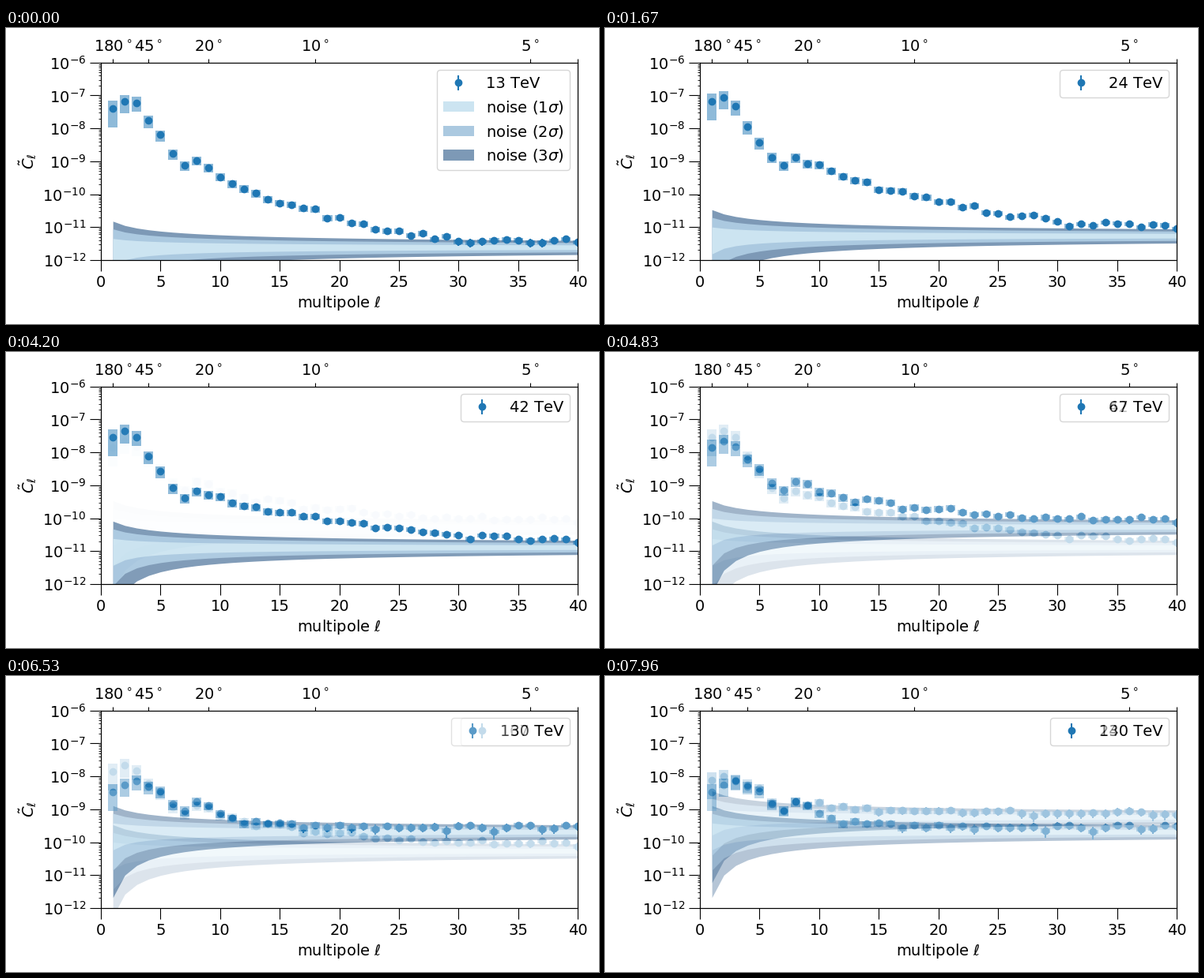
Recreate the animation shown at these times as a matplotlib script. Size 750 by 375 pixels, loop 7.99 s.

```python
import numpy as np
import matplotlib.pyplot as plt
from matplotlib.animation import FuncAnimation
from matplotlib.patches import Patch

plt.rcParams.update({"font.family": "DejaVu Sans", "font.size": 14,
                     "text.kerning_factor": 6})

W, H, DPI = 750, 375, 100
TICK, HOLD, STEP, STEPS = 10, 800, 30, 30
CYCLE = HOLD + STEP * STEPS
LOOP = 7990

BLUE = "#1f77b4"
BANDS = ["#cce4f1", "#abc9e0", "#7d99b6"]  # 1, 2, 3 sigma
TAILS = np.array([0.158655, 0.022750, 0.001350])

ell = np.arange(1, 41)
spread = 0.9 * np.sqrt(2 / (2 * ell + 1))

# energy in TeV: -log10 of the noise level, and of the power at the knots
KNOTS = [1, 2, 3, 5, 8, 12, 30, 40]
SPECTRA = {
    13: (11.61, [7.40, 7.18, 7.22, 8.19, 8.95, 9.85, 11.42, 11.42]),
    24: (11.26, [7.18, 7.06, 7.33, 8.42, 8.86, 9.42, 10.85, 10.97]),
    42: (10.88, [7.53, 7.36, 7.53, 8.57, 9.16, 9.58, 10.50, 10.70]),
    67: (10.26, [7.85, 7.67, 7.84, 8.50, 8.86, 9.38, 10.03, 10.08]),
    130: (9.68, [8.48, 8.26, 8.14, 8.44, 8.74, 9.45, 9.58, 9.52]),
    240: (9.23, [8.12, 7.99, 8.12, 8.36, 8.75, 8.97, 9.12, 9.14]),
}


def spectrum(energy, levels):
    """Knots joined in log-log, a dip near l = 6.6 and scatter beyond l = 8."""
    logs = np.interp(np.log(ell), np.log(KNOTS), levels)
    logs += 0.5 * np.exp(-((ell - 6.6) / 0.8) ** 2)
    logs += np.random.default_rng(energy).normal(0, 0.05, ell.size) * (ell > 8)
    return 10 ** -logs


def chi2_log(dof, probs):
    """log10 of the quantiles of chi2/dof."""
    t = np.linspace(-14, 6, 8001)
    cdf = np.cumsum(np.exp(dof / 2 * (t - np.log(dof) + 1) - np.exp(t) / 2))
    return (np.interp(probs, cdf / cdf[-1], t) - np.log(dof)) / np.log(10)


lower = np.array([chi2_log(2 * l + 1, TAILS) for l in ell])
upper = 1.1 * np.array([chi2_log(2 * l + 1, 1 - TAILS) for l in ell])


def style(ax):
    ax.set_yscale("log")
    ax.set_xlim(0, 40)
    ax.set_ylim(1e-12, 1e-6)
    ax.set_xticks(range(0, 41, 5))
    ax.tick_params(which="major", length=10)
    ax.set_xlabel(r"multipole $\ell$")
    ax.set_ylabel(r"$\tilde{C}_\ell$")
    top = ax.twiny()
    top.set_xlim(0, 40)
    marks = [1, 4, 9, 18, 36]
    top.set_xticks(marks + [40], [rf"${180 // m}^\circ$" for m in marks] + [""])


def plot(fig, energy, show_bands):
    """Draw one energy bin and return the picture as an RGB array."""
    fig.clf()
    x0, y0, x1, y1 = 120.1, 81.1, 723.0, 331.3
    ax = fig.add_axes([x0 / W, y0 / H, (x1 - x0) / W, (y1 - y0) / H])
    noise, levels = SPECTRA[energy]
    power = spectrum(energy, levels)
    floor = 10 ** -noise
    for i in (2, 1, 0):
        ax.fill_between(ell, floor * 10 ** lower[:, i], floor * 10 ** upper[:, i],
                        color=BANDS[i], lw=0)
    ax.bar(ell, 2 * spread * power, bottom=power * (1 - spread), width=0.8,
           color=BLUE, alpha=0.5, lw=0)
    handles = [ax.errorbar(ell, power, yerr=0.4 * floor, fmt="o",
                           color=BLUE, label=f"{energy} TeV")]
    if show_bands:
        handles += [Patch(color=c, lw=0, label=rf"noise ({i}$\sigma$)")
                    for i, c in enumerate(BANDS, 1)]
    ax.legend(handles=handles, loc="upper right")
    style(ax)
    fig.canvas.draw()
    return np.asarray(fig.canvas.buffer_rgba())[..., :3].astype(np.float32)


fig = plt.figure(figsize=(W / DPI, H / DPI), dpi=DPI, facecolor="white")
pages = [plot(fig, energy, energy == 13) for energy in SPECTRA]
fig.clf()
picture = fig.figimage(pages[0].astype(np.uint8))


def draw(frame):
    page, t = divmod(frame * TICK, CYCLE)
    step = 0 if t < HOLD else (t - HOLD) // STEP + 1
    mix = pages[page]
    if step:
        mix = mix + (pages[page + 1] - mix) * np.float32(step / STEPS)
    picture.set_data((mix + np.float32(0.5)).astype(np.uint8))
    return [picture]


anim = FuncAnimation(fig, draw, frames=LOOP // TICK, interval=TICK,
                     repeat=True, repeat_delay=0, blit=False)
plt.show()
```
